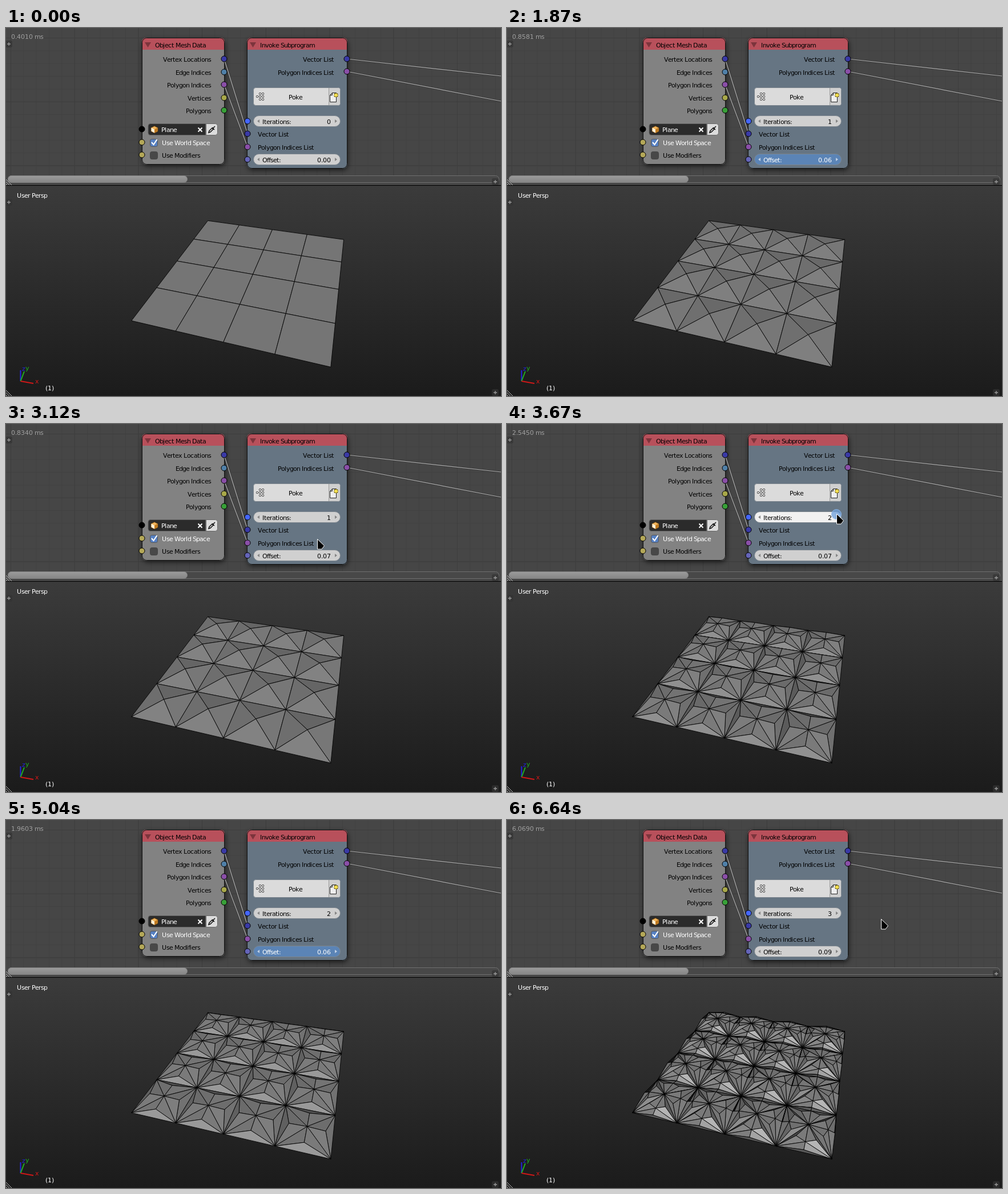
Write an HTML page with a canvas that moves like this. It is 867 px wide and 644 px high and loops after 6.68 s.

```html
<!DOCTYPE html>
<html lang="en">
<head>
<meta charset="utf-8">
<title>Poke subprogram</title>
<style>
  html, body { margin: 0; width: 100%; height: 100%; overflow: hidden; background: #1b1b1b; }
  svg, canvas { position: absolute; left: 0; top: 0; width: 867px; height: 644px; }
  text { font: 11px "DejaVu Sans", sans-serif; white-space: pre; }
</style>
</head>
<body>
<svg id="ui" viewBox="0 0 867 644">
  <defs>
    <pattern id="minor" width="22.34" height="22.34" patternUnits="userSpaceOnUse" x="8" y="17">
      <path d="M0 .5H22.34M.5 0V22.34" stroke="#414141"/>
    </pattern>
    <pattern id="major" width="111.7" height="111.7" patternUnits="userSpaceOnUse" x="8" y="17">
      <path d="M0 .5H111.7M.5 0V111.7" stroke="#3d3d3d"/>
    </pattern>
    <linearGradient id="sky" x2="0" y2="1">
      <stop stop-color="#3b3b3b"/><stop offset="1" stop-color="#1b1b1b"/>
    </linearGradient>
    <linearGradient id="bar" x2="0" y2="1">
      <stop stop-color="#9b9b9b"/><stop offset="1" stop-color="#858585"/>
    </linearGradient>
    <filter id="soft" x="-20%" y="-20%" width="140%" height="140%"><feGaussianBlur stdDeviation="4"/></filter>
  </defs>

  <rect width="867" height="275" fill="#464646"/>
  <rect width="867" height="258" fill="url(#minor)"/>
  <rect width="867" height="258" fill="url(#major)"/>
  <rect y="276" width="867" height="368" fill="url(#sky)"/>
  <rect x="3.5" y="258.5" width="860" height="12" rx="6" fill="#484848" stroke="#6f6f6f"/>
  <rect x="3.5" y="258.5" width="314" height="12" rx="6" fill="url(#bar)" stroke="#808080"/>
  <path d="M0 275.5H867" stroke="#000"/>
  <g id="corners"></g>

  <g id="nodes"></g>
  <g id="links" fill="none"></g>
  <g id="sockets" stroke="#000"></g>

  <!-- subprogram button -->
  <rect x="433.5" y="104.5" width="152" height="31" rx="4" fill="#dbdbdb" stroke="#7d868e"/>
  <path d="M565.5 105V135" stroke="#999"/>
  <path d="M566 105h16q3 0 3 3v24q0 3-3 3h-16z" fill="#cfcfcf"/>
  <g id="dots" fill="#fff" stroke="#111"></g>
  <path d="M567.5 117.5l4-4h7v16h-11zM567.5 117.5h4v-4" fill="#eee" stroke="#222"/>
  <path d="M574.5 117.5h7M578 114v7" stroke="#6a5a10" stroke-width="5"/>
  <path d="M575 117.5h6M578 114.5v6" stroke="#f4e050" stroke-width="3"/>

  <!-- object picker -->
  <path d="M253 167.5H349.5V187.5H253q-4 0-4-4v-12q0-4 4-4z" fill="#2b2b2b" stroke="#666"/>
  <path d="M350.5 167.5h16q4 0 4 4v12q0 4-4 4h-16z" fill="#dcdcdc" stroke="#666"/>
  <path d="M336.5 174.500l7 7m0-7l-7 7" stroke="#fff" stroke-width="2"/>
  <path d="M355 183l1-3 5-5 2 2-5 5zM361 174l4 4M363 175l3-3" stroke="#111" fill="#eee" stroke-width="1.5"/>
  <path d="M260 171.500l6 3v6.500l-6 3-6-3v-6.500z" fill="#f0b45c" stroke="#5a3a10"/>
  <path d="M254.5 174.500l5.500 3v6l-5.500-3z" fill="#fff2d8"/>
  <path d="M260 177.500l5.500-3v6l-5.500 3z" fill="#c07a20"/>

  <!-- checkboxes -->
  <rect x="252.5" y="194.5" width="13" height="13" rx="3" fill="#5680c2" stroke="#555"/>
  <path d="M255 200l3.500 4 6-9" fill="none" stroke="#fff" stroke-width="2"/>
  <rect x="252.5" y="216.5" width="13" height="13" rx="3" fill="#484848" stroke="#444"/>

  <g id="fields"></g>

  <!-- view axes -->
  <g fill="none" stroke-width="2">
    <path d="M25.500 618V599" stroke="#2424e0"/>
    <path d="M25.500 618L32 601" stroke="#20b020"/>
    <path d="M25.500 618L48 622" stroke="#d01818"/>
  </g>
  <g id="labels"></g>
  <circle id="halo" fill="#6f9fdc" stroke="#8db8ea"/>
  <path id="cursor" d="M0 0L12 11.500 7.500 17.500H0z" fill="#000" stroke="#fff"/>
</svg>
<canvas id="mesh" width="867" height="644"></canvas>

<script>
const LOOP = 6680;
const $ = id => document.getElementById(id);
const ctx = $('mesh').getContext('2d');

function add(parent, tag, attrs) {
  const el = document.createElementNS('http://www.w3.org/2000/svg', tag);
  for (const k in attrs) el.setAttribute(k, attrs[k]);
  return $(parent).appendChild(el);
}

// Text with whole-pixel glyph advances, as the interface toolkit sets it.
const ruler = document.createElement('canvas').getContext('2d');
ruler.font = '100px "DejaVu Sans", sans-serif';
const advance = ch => Math.floor(ruler.measureText(ch).width * .11 + .01);

function setText(el, str) {
  if (el.textContent === str) return;
  const steps = [...str].map(advance);
  let x = +el.dataset.x;
  if (el.dataset.right) x -= steps.reduce((a, b) => a + b, 0);
  el.textContent = str;
  el.setAttribute('x', steps.map(s => (x += s) - s).join(' '));
}

function label(str, x, y, { fill = '#000', right = '', parent = 'labels' } = {}) {
  const el = add(parent, 'text', { y, style: `fill:${fill}`, 'data-x': x, 'data-right': right });
  setText(el, str);
  return el;
}

// Static interface
function node(x, y, w, h, body, title) {
  add('nodes', 'rect', { x: x + 1, y: y + 3, width: w, height: h, rx: 9, opacity: .6, filter: 'url(#soft)' });
  add('nodes', 'rect', { x, y, width: w, height: h, rx: 8, fill: body });
  add('nodes', 'path', { d: `M${x} ${y + 21}v-13q0-8 8-8h${w - 16}q8 0 8 8v13z`, fill: '#b8505b' });
  add('nodes', 'rect', { x: x + .5, y: y + .5, width: w - 1, height: h - 1, rx: 8, fill: 'none', stroke: '#111' });
  add('nodes', 'path', { d: `M${x + 5} ${y + 8}h11l-5.500 9z`, fill: '#7c343c' });
  label(title, x + 23, y + 17);
}
node(238, 17, 145, 222, '#828282', 'Object Mesh Data');
node(422, 17, 176, 229, '#667583', 'Invoke Subprogram');

for (const d of ['M382 54L423 185', 'M382 99L423 208', 'M597 54L867 84', 'M597 76L867 128']) {
  add('links', 'path', { d, stroke: '#333', 'stroke-width': 2.6 });
  add('links', 'path', { d, stroke: '#b0b0b0', 'stroke-width': 1.2 });
}

const violet = '#8a4fa8', navy = '#3a3aa6', sand = '#b4a858';
const sockets = [
  [382, 54, navy], [382, 77, '#5080a8'], [382, 99, violet], [382, 122, '#a8a84a'], [382, 144, '#38a038'],
  [238, 177, '#000'], [238, 200, sand], [238, 222, sand], [597, 54, navy], [597, 76, violet],
  [423, 163, '#4466ff'], [423, 185, navy], [423, 208, violet], [423, 230, '#6464b8']];
for (const [cx, cy, fill] of sockets) add('sockets', 'circle', { cx, cy, r: 5, fill });

['Vertex Locations', 'Edge Indices', 'Polygon Indices', 'Vertices', 'Polygons']
  .forEach((s, i) => label(s, 359, Math.round(59 + i * 22.5), { right: 1 }));
label('Vector List', 574, 59, { right: 1 });
label('Polygon Indices List', 574, 82, { right: 1 });
label('Vector List', 441, 190);
label('Polygon Indices List', 441, 213);
label('Poke', 495, 125);
label('Plane', 272, 182, { fill: '#fff' });
label('Use World Space', 273, 205, { fill: '#fff' });
label('Use Modifiers', 273, 227);
label('User Persp', 19, 297, { fill: '#fff' });
label('(1)', 69, 634, { fill: '#fff' });
label('z', 28, 600, { fill: '#2424e0' });
label('y', 34, 599, { fill: '#20b020' });
label('x', 51, 622, { fill: '#d01818' });
const timer = label('', 9, 19, { fill: '#a0a0a0' });

for (const [x, y] of [[5, 28], [5, 305], [857, 269], [857, 638]]) {
  add('corners', 'rect', { x: x - 6, y: y - 6, width: 12, height: 12, rx: 3, fill: '#333', opacity: .7 });
  add('corners', 'path', { d: `M${x - 3} ${y}h6M${x} ${y - 3}v6`, stroke: '#999', 'stroke-width': 1.3 });
}
for (const y of [275, 644])
  add('corners', 'path', { d: `M0 ${y - 10}l10 10M0 ${y - 6}l6 6M0 ${y - 2}l2 2`, stroke: '#bbb' });

for (let i = 0; i < 9; i++)
  if (i !== 0 && i !== 6)
    add('dots', 'rect', { x: 438.5 + i % 3 * 5, y: 113.5 + (i / 3 | 0) * 5, width: 3, height: 3, rx: 1 });

function field(y, name) {
  const box = add('fields', 'rect', { x: 433.5, y: y + .5, width: 152, height: 19, rx: 9.5, stroke: '#7d868e' });
  const arrows = add('fields', 'path', { d: `M444 ${y + 7}v6l-4-3zM576 ${y + 7}v6l4-3z` });
  const title = label(name, 449, y + 15, { parent: 'fields' });
  const value = label('', 569, y + 15, { right: 1, parent: 'fields' });
  return (text, hover, held) => {
    box.setAttribute('fill', held ? '#5b84b6' : hover ? '#f1f1f1' : '#d0d0d0');
    arrows.setAttribute('fill', held ? '#c0d0e4' : '#858585');
    title.style.fill = value.style.fill = held ? '#fff' : '#000';
    setText(value, text);
  };
}
const showIterations = field(153, 'Iterations:');
const showOffset = field(220, 'Offset:');

// Timeline
const path = [[290, 596, 160], [450, 577, 157], [860, 577, 157], [1140, 513, 207], [1260, 520, 222],
  [1480, 526, 227], [3000, 526, 227], [3320, 577, 157], [4050, 577, 157], [4450, 526, 227],
  [5390, 526, 227], [5570, 574, 174], [5690, 577, 157], [6520, 577, 157], [6640, 655, 173]];
const offsets = [[1670, 0], [2100, .12], [2330, .1], [2400, .09], [2425, .09], [2460, .07], [4590, .07],
  [4630, .06], [4790, .05], [4960, .05], [5340, .09]];
const costs = [[0, .401], [640, .881], [2400, .834], [3630, 2.545], [4610, 2.007], [5340, 1.848], [5860, 6.069]];
const clicks = [640, 3630, 5860];
const drags = [[1670, 2460], [4590, 5390]];
const busy = [[1670, 2400], [4650, 4790], [4960, 5340]];
const HALO = 240;

const within = (spans, t) => spans.some(([a, b]) => t >= a && t < b);

function sample(keys, t) {
  const i = keys.findIndex(k => k[0] > t);
  if (i === 0) return keys[0].slice(1);
  if (i < 0) return keys[keys.length - 1].slice(1);
  const a = keys[i - 1], b = keys[i], p = (t - a[0]) / (b[0] - a[0]);
  return a.slice(1).map((v, j) => v + (b[j + 1] - v) * p);
}

function cost(t) {
  const ms = costs.filter(c => c[0] <= t).pop()[1];
  if (!within(busy, t)) return ms;
  const noise = Math.sin(Math.floor(t / 40) * 12.9898) * 43758.5453;
  return ms * (.94 + .12 * (noise - Math.floor(noise)));
}

// Mesh
const sub = (a, b) => a.map((v, i) => v - b[i]);
const dot = (a, b) => a[0] * b[0] + a[1] * b[1] + a[2] * b[2];
const mean = pts => [0, 1, 2].map(i => pts.reduce((s, p) => s + p[i], 0) / pts.length);

function normal([a, b, c]) {
  const p = sub(b, a), q = sub(c, a);
  const n = [p[1] * q[2] - p[2] * q[1], p[2] * q[0] - p[0] * q[2], p[0] * q[1] - p[1] * q[0]];
  return n.map(v => v / Math.hypot(...n));
}

function poke(face, height) {
  const n = normal(face);
  const tip = mean(face).map((v, i) => v + n[i] * height);
  return face.map((p, i) => [p, face[(i + 1) % face.length], tip]);
}

// Camera looking at the 2 x 2 plane
function project([x, y, z]) {
  const u = (x + 1) / 2, v = (1 - y) / 2, k = z / 2;
  const w = 1 - .09739 * u - .32447 * v - .3469 * k;
  return [(353.5 + 180.44 * u - 205.06 * v - 154.2 * k) / w, (337.2 - 3.03 * u + 8.87 * v - 321 * k) / w, w];
}

function shade(n) {
  const shine = Math.max(0, dot(n, [.17, -.5, .85])) ** 60;
  const g = Math.round(40 + dot(n, [17, -47, 77]) + 55 * shine);
  return `rgb(${g},${g},${g})`;
}

function drawMesh(iterations, offset) {
  let faces = [];
  for (let j = 0; j < 4; j++) for (let i = 0; i < 4; i++) {
    const x = i / 2 - 1, y = j / 2 - 1;
    faces.push([[x, y, 0], [x + .5, y, 0], [x + .5, y + .5, 0], [x, y + .5, 0]]);
  }
  for (let i = 1; i <= iterations; i++) faces = faces.flatMap(f => poke(f, offset / i));

  ctx.clearRect(0, 0, 867, 644);
  ctx.lineWidth = .85;
  ctx.lineJoin = 'round';
  ctx.strokeStyle = '#000';
  faces.map(f => ({ pts: f.map(project), fill: shade(normal(f)), depth: project(mean(f))[2] }))
    .sort((a, b) => b.depth - a.depth)
    .forEach(({ pts, fill }) => {
      ctx.beginPath();
      pts.forEach(([x, y]) => ctx.lineTo(x, y));
      ctx.closePath();
      ctx.fillStyle = fill;
      ctx.fill();
      ctx.stroke();
    });
}

let drawn = '';
function render(t) {
  const iterations = clicks.filter(c => c <= t).length;
  const [offset] = sample(offsets, t);
  const [x, y] = sample(path, t);
  const held = within(drags, t);
  const visible = t >= 290 && !held;
  const over = top => visible && x < 586 && y >= top && y < top + 20;

  showIterations(String(iterations), over(153), false);
  showOffset(offset.toFixed(2), over(220), held);
  setText(timer, cost(t).toFixed(4) + ' ms');

  $('cursor').setAttribute('transform', `translate(${Math.round(x) + .5} ${Math.round(y) + .5})`);
  $('cursor').style.display = visible ? '' : 'none';

  const press = [...clicks, ...drags.map(d => d[1])].find(c => t >= c && t < c + HALO);
  const halo = $('halo');
  halo.style.display = press === undefined ? 'none' : '';
  if (press !== undefined) {
    const age = (t - press) / HALO, onOffset = !clicks.includes(press);
    halo.setAttribute('cx', onOffset ? 526 : 577);
    halo.setAttribute('cy', onOffset ? 230 : 158);
    halo.setAttribute('r', 7.5 + 6 * age);
    halo.setAttribute('fill-opacity', Math.max(0, 1 - age * 1.4));
    halo.setAttribute('stroke-opacity', 1 - age * .7);
  }

  const key = iterations + '/' + offset;
  if (key !== drawn) {
    drawMesh(iterations, offset);
    drawn = key;
  }
}

const start = performance.now();
function tick() {
  render((performance.now() - start) % LOOP);
  requestAnimationFrame(tick);
}
tick();
</script>
</body>
</html>
```
